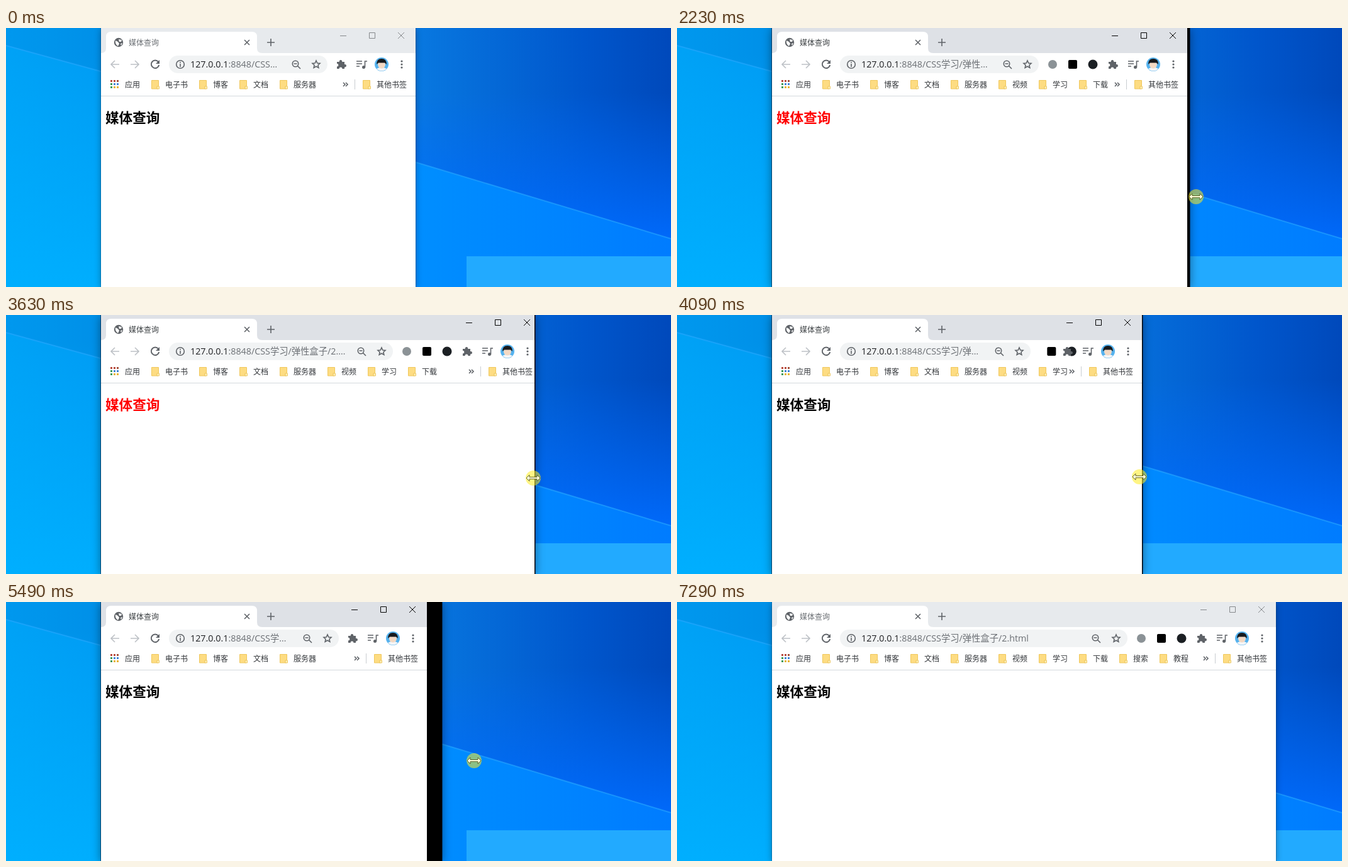
Animation, 1057 px wide and 413 px high, one loop 7370 ms. Source, as an HTML page:

```html
<!DOCTYPE html>
<html lang="zh-CN">
<head>
<meta charset="utf-8">
<title>媒体查询</title>
<style>
html, body { margin: 0; width: 100%; height: 100%; overflow: hidden; }
body { position: relative; background: #0098ee; font-family: "Open Sans", "Noto Sans CJK SC", "Noto Sans CJK", sans-serif; }
svg { position: absolute; left: 0; top: 0; display: block; }
#window { position: absolute; left: 151px; top: 0; height: 413px; background: #000; }
#content { position: absolute; left: 0; top: 0; height: 413px; overflow: hidden; background: #fff; }
#content svg { left: -151px; }
#url { position: absolute; left: 142px; top: 48px; font-size: 14.3px; line-height: 20px; color: #6b6f74;
  white-space: nowrap; overflow: hidden; text-overflow: ellipsis; }
#url b { font-weight: 400; color: #202124; }
.line { fill: none; stroke: #5f6368; stroke-width: 1.6; }
.dark { fill: #5f6368; }
</style>
</head>
<body>
<svg width="1057" height="413">
  <defs>
    <linearGradient id="sky">
      <stop offset="0" stop-color="#0098ee"/><stop offset=".14" stop-color="#0090e8"/>
      <stop offset=".62" stop-color="#0878e0"/><stop offset=".87" stop-color="#0056cc"/><stop offset="1" stop-color="#0049bb"/>
    </linearGradient>
    <linearGradient id="glow" x2="0" y2="1">
      <stop offset=".25" stop-color="#006cff" stop-opacity="0"/><stop offset=".8" stop-color="#006cff" stop-opacity=".9"/>
    </linearGradient>
    <linearGradient id="floor">
      <stop offset="0" stop-color="#00a2f6"/><stop offset=".14" stop-color="#009cf4"/>
      <stop offset=".62" stop-color="#008eff"/><stop offset="1" stop-color="#007cff"/>
    </linearGradient>
    <linearGradient id="left" x2="0" y2="1">
      <stop offset=".1" stop-color="#00b0ff" stop-opacity="0"/><stop offset="1" stop-color="#00b0ff" stop-opacity=".9"/>
    </linearGradient>
  </defs>
  <rect width="1057" height="413" fill="url(#sky)"/>
  <rect x="600" width="457" height="413" fill="url(#glow)"/>
  <path d="M0 28L150 69 651 214 1057 336V413H0Z" fill="url(#floor)"/>
  <path d="M0 28L150 69 651 214 1057 336" fill="none" stroke="#2aa8ff" stroke-opacity=".6" stroke-width="2"/>
  <rect width="400" height="413" fill="url(#left)"/>
  <rect x="732" y="364" width="400" height="400" fill="#22aaff"/>
</svg>

<div id="window"><div id="content">
  <svg width="1057" height="413">
    <rect id="bar" width="1057" height="40"/>
    <path d="M151 40Q159 40 159 32V14Q159 6 167 6H391Q399 6 399 14V32Q399 40 407 40Z" fill="#fff"/>
    <circle cx="179" cy="23" r="7.2" class="dark"/>
    <path d="M174 20L178 22 180 25 178 29Q173 26 174 20ZM179 18L184 19 183 22 180 22ZM182 25L185 24 183 28Z" fill="#fff"/>
    <text id="tabTitle" x="195" y="27.5" font-size="12">媒体查询</text>
    <path d="M379 19l8 8m0-8l-8 8M415 23h12m-6-6v12" class="line"/>

    <path d="M180 58h-13m6-6l-6 6 6 6M198 58h13m-6-6l6 6-6 6" class="line" style="stroke:#bdc1c6"/>
    <path d="M242 54a6.2 6.2 0 1 0 1.2 5" class="line" style="stroke-width:2"/>
    <path d="M244 51v6h-6Z" class="dark"/>
    <rect id="omnibox" x="259" y="44" height="28" rx="14" fill="#f1f3f4"/>
    <circle cx="277" cy="58" r="6.3" class="line" stroke-width="1.5"/>
    <path d="M277 57v5M277 54v1.7" class="line"/>
    <g id="omniIcons" class="line">
      <circle cx="-51" cy="57" r="4.7"/><path d="M-47.5 60.5l4.5 4.5M-53.5 57h5"/>
      <path transform="translate(-18 58)" d="M0-6L1.8-2 6-1.6 2.9 1.2 3.8 5.4 0 3.2-3.8 5.4-2.9 1.2-6-1.6-1.8-2Z"/>
    </g>
    <g id="extensions">
      <circle cx="-32" cy="58" r="7" fill="#8b9296"/>
      <rect x="-7" y="51" width="14" height="14" rx="2"/>
      <circle cx="32" cy="58" r="7.5" fill="#1b1f23"/>
    </g>

    <path d="M151 108.5H1057" stroke="#d5d9dd"/>
    <g id="apps"></g>
    <g font-size="12" fill="#33363a">
      <text x="189" y="94.5">应用</text>
      <g id="bookmarks"></g>
    </g>
    <text id="heading" x="158" y="150.5" font-size="21.6" font-weight="700">媒体查询</text>

    <g id="rightSide">
      <path id="controls" d="M-120 12.5h10M-73.5 7.5h9v9h-9ZM-28 7l10 10m0-10l-10 10" fill="none"/>
      <path transform="translate(-118 58)" class="dark"
        d="M-7-4H-3.2a2.3 2.3 0 1 1 4.4 0H5V0a2.3 2.3 0 1 1 0 4.4V7H1.4a2.4 2.4 0 0 0-4.8 0H-7V3.6a2.4 2.4 0 0 0 0-4.8Z"/>
      <path d="M-94 53h9m-9 4h9m-9 4h5M-80.500 63V53h3.500" class="line"/>
      <circle cx="-82.500" cy="62.500" r="2.500" class="dark"/>
      <circle cx="-54" cy="58" r="11" fill="#55b2ee"/>
      <path d="M-62 65Q-54 60-46 65A11 11 0 0 1-62 65Z" fill="#f4f6f8"/>
      <circle cx="-54" cy="58.500" r="6" fill="#f3d9c4"/>
      <path d="M-62 58Q-62 49-54 49T-46 58L-49 55.500H-59Z" fill="#17191c"/>
      <g class="dark"><circle cx="-22" cy="53" r="1.600"/><circle cx="-22" cy="58" r="1.600"/><circle cx="-22" cy="63" r="1.600"/></g>
      <path d="M-115 87l3 3-3 3m4-6l3 3-3 3" class="line"/>
      <path d="M-96.500 82v16" stroke="#c9cdd1"/>
      <g id="otherBookmarks" font-size="12" fill="#33363a"></g>
    </g>
  </svg>
  <div id="url"><b>127.0.0.1</b>:8848/CSS学习/弹性盒子/2.html</div>
</div></div>

<svg width="1057" height="413">
  <g id="cursor">
    <circle r="12" fill="#ffec20" fill-opacity=".55"/>
    <path id="arrow" d="M0 0V16L3.700 12.600 6.200 17.500 8.600 16.500 6.300 11.600H11.500Z" fill="#fff" stroke="#222" stroke-width=".9"/>
    <path id="resize" d="M-11 0L-6-5V-1.500H6V-5L11 0 6 5V1.500H-6V5Z" fill="#ffffd8" stroke="#55551c" stroke-width=".9"/>
  </g>
</svg>

<script>
const LOOP = 7370, LEFT = 151;
const $ = id => document.getElementById(id);
const show = (el, on) => el.setAttribute('visibility', on ? 'visible' : 'hidden');
const clamp = (v, lo, hi) => Math.min(hi, Math.max(lo, v));

// Bursts of movement: first step, last step, number of steps. The picture rests between them.
const bursts = [[90, 220, 3], [370, 450, 2], [600, 990, 6], [1220, 1220, 1], [1370, 2070, 10],
  [2150, 2850, 10], [2920, 3240, 5], [3390, 4090, 10], [4170, 4470, 5], [4640, 5030, 6],
  [5490, 5900, 6], [6130, 6370, 4], [6680, 6980, 5], [7290, 7290, 1]];

// time, right edge of the layout, of the painted content, of the window frame
const windowKeys = [[1220, 651, 651, 651], [1526, 719, 719, 722], [2070, 788, 788, 792],
  [2920, 910, 910, 914], [3240, 1000, 1000, 1003], [3623, 851, 840, 841], [4090, 739, 739, 740],
  [4470, 856, 856, 857], [4640, 856, 845, 849], [5030, 669, 669, 669], [5490, 669, 669, 693],
  [5572, 905, 905, 940], [5900, 1040, 1040, 1042], [6370, 952, 952, 952]];

// time, x, y
const cursorKeys = [[90, 745, 317], [150, 650, 290], [220, 582, 276], [370, 640, 277], [450, 692, 276],
  [600, 690, 278], [990, 654, 279], [1220, 654, 279], [1526, 735, 269], [2070, 803, 269],
  [2920, 919, 269], [3240, 1008, 266], [3623, 838, 260], [4090, 735, 258], [4470, 859, 256],
  [4640, 845, 256], [5030, 666, 254], [5490, 744, 253], [5572, 930, 253], [5900, 1043, 253],
  [6370, 954, 252], [6680, 960, 262], [6980, 1043, 390]];

function snap(t) {
  const burst = bursts.findLast(b => b[0] <= t);
  if (!burst) return 0;
  const [start, end, steps] = burst;
  const step = (end - start) / (steps - 1) || 1;
  return start + Math.min(steps - 1, Math.floor((t - start) / step + 1e-6)) * step;
}

function sample(keys, t) {
  const next = keys.findIndex(k => k[0] > t);
  if (next === 0) return keys[0].slice(1);
  if (next < 0) return keys.at(-1).slice(1);
  const a = keys[next - 1], b = keys[next], u = (t - a[0]) / (b[0] - a[0]);
  return a.slice(1).map((v, i) => Math.round(v + (b[i + 1] - v) * u));
}

const bookmark = (x, label) => `<g>
  <path d="M${x + .5} 83.500h11v9l-1 4.500h-10Z" fill="#fddc82" stroke="#efc75c"/>
  <path d="M${x + 9} 97v-4h3.500v4Z" fill="#fff0b8" stroke="#e9bd4c" stroke-width=".8"/>
  <text x="${x + 22}" y="94.5">${label}</text></g>`;

const labels = ['电子书', '博客', '文档', '服务器', '视频', '学习', '下载', '搜索', '教程'];
let nextX = 231;
const bookmarkEnds = labels.map(label => {
  const x = nextX, textWidth = label.length * 12;
  $('bookmarks').innerHTML += bookmark(x, label);
  nextX += textWidth + 40;
  return x + 22 + textWidth;
});
$('otherBookmarks').innerHTML = bookmark(-84, '其他书签');

const dotColors = ['#b8493c', '#b8493c', '#a5523c', '#3f9a58', '#4285d8', '#4285d8', '#3f9a58', '#e6b32e', '#e6b32e'];
$('apps').innerHTML = dotColors.map((color, i) =>
  `<rect x="${166 + i % 3 * 5}" y="${83 + Math.floor(i / 3) * 5}" width="3" height="3" fill="${color}"/>`).join('');

function draw(now) {
  const t = snap(now % LOOP);
  const active = t >= 1220 && t < 7290;
  const [layout, painted, frame] = sample(windowKeys, t);

  $('window').style.width = frame - LEFT + 'px';
  $('window').style.boxShadow = active
    ? '0 0 0 1px rgba(0,20,50,.6), 0 2px 14px rgba(0,0,0,.45)'
    : '0 0 0 1px rgba(0,50,100,.3), 0 2px 10px rgba(0,0,0,.35)';
  $('content').style.width = painted - LEFT + 'px';
  $('bar').setAttribute('fill', active ? '#dee1e6' : '#e7eaed');
  $('tabTitle').setAttribute('fill', active ? '#3c4043' : '#6a6e73');
  $('controls').setAttribute('stroke', active ? '#000' : '#85888b');
  $('rightSide').setAttribute('transform', `translate(${layout} 0)`);

  // Extension icons get room only once the address box is wide enough.
  const room = clamp(layout - 702, 0, 96);
  const omniRight = layout - 140 - room;
  $('omnibox').setAttribute('width', omniRight - 259);
  $('omniIcons').setAttribute('transform', `translate(${omniRight} 0)`);
  $('url').style.width = omniRight - 70 - 293 + 'px';
  $('extensions').setAttribute('transform', `translate(${layout - 182 + (96 - room) * .65} 0)`);
  [64, 0, 32].forEach((need, i) => show($('extensions').children[i], room > need));

  bookmarkEnds.forEach((end, i) => show($('bookmarks').children[i], end < layout - 115));
  const pageWidth = (layout - LEFT) / .9;
  $('heading').setAttribute('fill', pageWidth >= 700 && pageWidth <= 800 ? '#f00' : '#000');

  const [x, y] = sample(cursorKeys, t);
  const resizing = t >= 990 && t < 6680;
  $('cursor').style.display = t >= 90 && t < 7290 ? '' : 'none';
  $('cursor').setAttribute('transform', `translate(${x} ${y})`);
  $('arrow').style.display = resizing ? 'none' : '';
  $('resize').style.display = resizing ? '' : 'none';
}

const startTime = performance.now();
function tick() {
  draw(performance.now() - startTime);
  requestAnimationFrame(tick);
}
tick();
</script>
</body>
</html>
```
